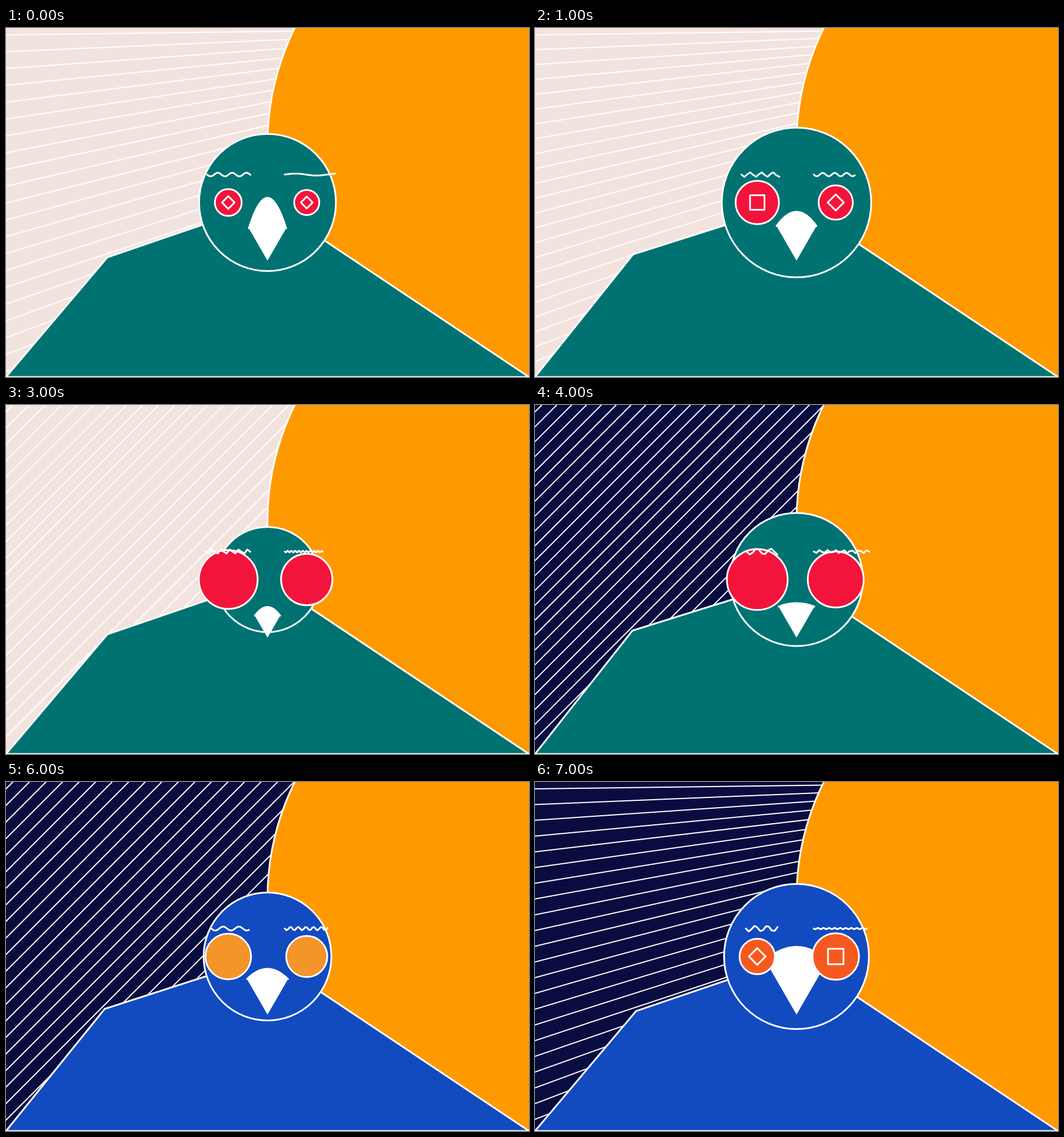
Write an HTML page with a canvas that moves like this. It is 917 by 611 pixels and loops after 8000 ms.

```html
<!DOCTYPE html>
<html lang="en">
<head>
<meta charset="utf-8">
<title>Bird portraits</title>
<style>
  html, body { margin: 0; width: 100%; height: 100%; overflow: hidden; }
  canvas { display: block; }
</style>
</head>
<body>
<canvas id="stage" width="917" height="611"></canvas>
<script>
const W = 917, H = 611, CX = W / 2, CY = H / 2;
const SCENE_MS = 1000;
const ctx = document.getElementById('stage').getContext('2d');

const PINK = '#f3e3df', NAVY = '#090c3f', SUN = '#ff9900';
const TEAL = '#007272', DARK_TEAL = '#025458', BLUE = '#124bc0';
const RED = '#f3143c', VERMILION = '#f6591e', AMBER = '#f39528';

// eyes: radii; beak: half width and arc height; pupils: left, right
// leftBrow: start x, step, count, phase step, amplitude; rightBrow: the same without x
const scenes = [
  { sky: PINK, fan: true, gap: 29.45, body: TEAL, shoulder: 177.5, head: 120,
    eye: RED, eyes: [23.5, 22], pupils: ['diamond', 'diamond'], beak: [32.7, 53.5],
    leftBrow: [352.5, 2, 38, 0.5, 3.2], rightBrow: [2.2, 40, 0.187, -1.7] },
  { sky: PINK, fan: true, gap: 26, body: TEAL, shoulder: 172, head: 131,
    eye: RED, eyes: [38, 30], pupils: ['square', 'diamond'], beak: [35, 25],
    leftBrow: [362, 5.1, 13, 1.6, 4], rightBrow: [2, 36, 0.6, 3] },
  { sky: NAVY, fan: true, gap: 27.28, body: DARK_TEAL, shoulder: 186.3, head: 94.5,
    eye: VERMILION, eyes: [54, 22], pupils: ['square', 'square'], pupilFill: DARK_TEAL,
    beak: [33.1, 13.3], leftBrow: [372.5, 6.2, 9, 2.62, -3], rightBrow: [2, 28, 0.483, 6] },
  { sky: PINK, fan: false, gap: 28.45, body: TEAL, shoulder: 177.5, head: 92,
    eye: RED, eyes: [51.5, 45], beak: [22.2, 15.5],
    leftBrow: [350.3, 5.2, 15, 2.1, 4], rightBrow: [1.33, 50, 1.26, 1.5] },
  { sky: NAVY, fan: false, gap: 26.05, body: TEAL, shoulder: 170.8, head: 116.5,
    eye: RED, eyes: [53.3, 49], beak: [31.4, 6.3],
    leftBrow: [371, 5.4, 10, 1.4, 5.2], rightBrow: [4.86, 20, 2.2, 2.8] },
  { sky: NAVY, fan: false, gap: 27.86, body: BLUE, shoulder: 167.2, head: 143,
    eye: AMBER, eyes: [48, 32], beak: [41.8, 14.5],
    leftBrow: [337.3, 2.2, 40, 0.346, 3.4], rightBrow: [1, 80, 1.57, 4.5] },
  { sky: NAVY, fan: false, gap: 29, body: BLUE, shoulder: 173, head: 112,
    eye: AMBER, eyes: [40, 36], beak: [36, 18],
    leftBrow: [360, 2.2, 30, 0.5, 3.5], rightBrow: [3, 25, 1.4, 3] },
  { sky: NAVY, fan: true, gap: 27.55, body: BLUE, shoulder: 177, head: 127,
    eye: VERMILION, eyes: [31, 40.8], pupils: ['diamond', 'square'], beak: [55, 23.6],
    leftBrow: [369.7, 5.05, 11, 1.48, 5], rightBrow: [2.33, 40, 1.5, 1.2] }
];

function paint(fill, width = 3) {
  if (fill) {
    ctx.fillStyle = fill;
    ctx.fill();
  }
  ctx.lineWidth = width;
  ctx.stroke();
}

function circle(x, y, r, fill) {
  ctx.beginPath();
  ctx.arc(x, y, r, 0, Math.PI * 2);
  paint(fill);
}

function drawSky({ sky, fan, gap }) {
  ctx.fillStyle = sky;
  ctx.fillRect(0, 0, W, H);
  ctx.beginPath();
  for (let d = 12; d < W; d += gap) {
    ctx.moveTo(0, d);
    ctx.lineTo(fan ? W + d : d, 0);
  }
  paint(null, 2);
}

function drawBody({ body, shoulder }) {
  ctx.beginPath();
  ctx.moveTo(0, H);
  ctx.lineTo(shoulder, shoulder + 224.2);
  ctx.lineTo(CX, CY);
  ctx.lineTo(W, H);
  ctx.closePath();
  paint(body);
}

function drawBeak([half, rise]) {
  const tip = H * 2 / 3, top = tip - half * Math.sqrt(3);
  const arc = () => {
    ctx.moveTo(CX - half, top);
    ctx.quadraticCurveTo(CX, top - 2 * rise, CX + half, top);
  };
  ctx.beginPath();
  arc();
  ctx.lineTo(CX, tip);
  ctx.fillStyle = '#fff';
  ctx.fill();
  ctx.beginPath();
  arc();
  ctx.stroke();
}

function drawEye(x, r, scene, pupil) {
  circle(x, CY, r, scene.eye);
  if (!pupil) return;
  const half = r / 3;
  ctx.save();
  ctx.translate(x, CY);
  if (pupil === 'diamond') ctx.rotate(Math.PI / 4);
  ctx.beginPath();
  ctx.rect(-half, -half, 2 * half, 2 * half);
  paint(scene.pupilFill);
  ctx.restore();
}

function drawBrow(x, step, count, phase, amp) {
  ctx.beginPath();
  for (let i = 0; i <= count; i++) {
    ctx.lineTo(x + i * step, 256.6 + amp * Math.sin(i * phase));
  }
  ctx.stroke();
}

function drawScene(scene) {
  const { eyes, pupils = [] } = scene;
  ctx.strokeStyle = '#fff';
  ctx.lineCap = 'round';
  ctx.lineJoin = 'round';
  drawSky(scene);
  circle(W, H / 3, CX, SUN);
  drawBody(scene);
  circle(CX, CY, scene.head, scene.body);
  drawBeak(scene.beak);
  [-1, 1].forEach((side, i) => drawEye(CX + side * 68.8, eyes[i], scene, pupils[i]));
  drawBrow(...scene.leftBrow);
  drawBrow(488.8, ...scene.rightBrow);
}

const start = performance.now();
function frame() {
  const elapsed = performance.now() - start;
  drawScene(scenes[Math.floor(elapsed / SCENE_MS) % scenes.length]);
  requestAnimationFrame(frame);
}
frame();
</script>
</body>
</html>
```
